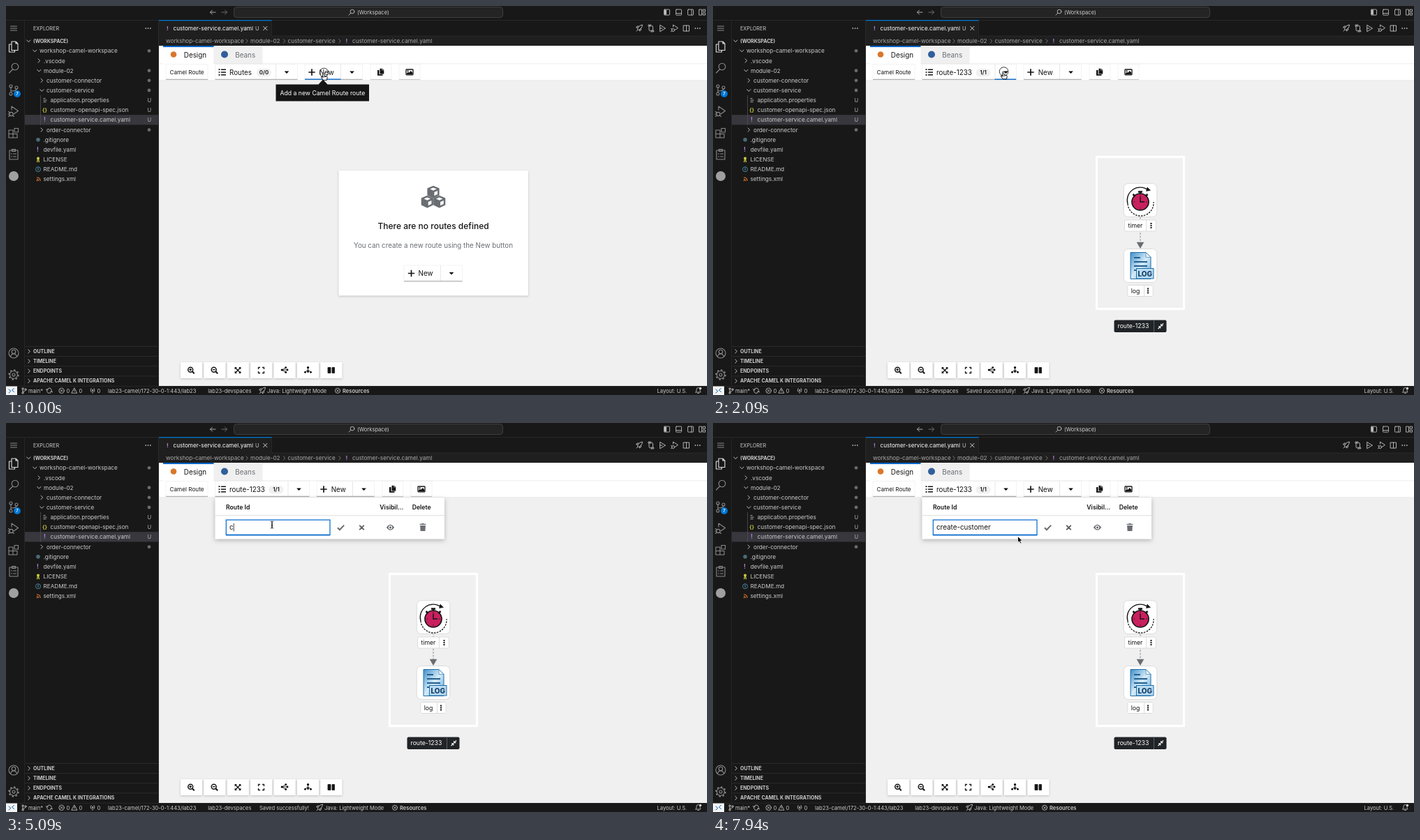
An HTML page that plays this animation: 1004 px wide and 558 px high, repeating every 8000 ms.

```html
<!DOCTYPE html>
<html lang="en">
<head>
<meta charset="utf-8">
<title>Route editor</title>
<style>
html, body { margin: 0; width: 100%; height: 100%; overflow: hidden; background: #181818; }
svg { display: block; width: 1004px; height: 558px; font-family: Inter, "Open Sans", sans-serif; }
text { white-space: pre; }
.tree { font-size: 8.2px; fill: #ccc; }
.head { font-size: 7px; font-weight: 700; fill: #ccc; }
.bar { font-size: 7.55px; fill: #ccc; }
.big { font-size: 9.85px; fill: #151515; }
.mid { font-size: 8.7px; fill: #151515; }
.th { font-size: 8.7px; font-weight: 600; fill: #151515; }
.line { fill: none; stroke: currentColor; stroke-linecap: round; stroke-linejoin: round; }
.btn { fill: #fff; stroke: #ececec; stroke-width: .6; }
.edge { stroke: #8a8d90; stroke-width: .8; }
.hot { stroke: #06c; stroke-width: 1.3; }
.node { fill: #fff; stroke: #d2d2d2; stroke-width: .7; }
.soft { filter: drop-shadow(0 1px 1.5px rgba(0,0,0,.2)); }
</style>
</head>
<body>
<svg id="stage" viewBox="0 0 1004 558">
<defs>
  <path id="down" class="line" d="M-2.6-1.3L0 1.4 2.6-1.3"/>
  <path id="right" class="line" d="M-1.3-2.6L1.4 0-1.3 2.6"/>
  <path id="caret" d="M-3.3-1.5h6.6L0 2z"/>
  <path id="plus" d="M-4.7 0h9.4M0-4.7v9.4" stroke="#151515" stroke-width="1.7"/>
  <g id="lens" class="line"><circle cx="1" cy="-1" r="2.9"/><path d="M-1.2 1.2L-4 4"/></g>
  <g id="zoom"><circle cx="-.8" cy="-.8" r="3.5" fill="none" stroke="#151515" stroke-width="1.5"/><path d="M2 2l2.7 2.7" stroke="#151515" stroke-width="2"/></g>
  <path id="ellipsis" d="M-4-.7h1.5v1.4h-1.5zM-.75-.7h1.5v1.4h-1.5zM2.5-.7h1.5v1.4h-1.5z" fill="currentColor"/>
  <path id="kebab" d="M-1-4h2v2h-2zM-1-1h2v2h-2zM-1 2h2v2h-2z" fill="#151515"/>
  <path id="cross" class="line" d="M-2.7-2.7l5.4 5.4M2.7-2.7l-5.4 5.4"/>
  <path id="check" d="M-4.6.2l3 3L4.7-3.4" fill="none" stroke="currentColor" stroke-width="2"/>
  <g id="eye"><path d="M-5.6 0Q0-8 5.6 0 0 8-5.6 0z" fill="#6a6e73"/><circle r="2.7" fill="#fff"/><circle r="1.6" fill="#6a6e73"/></g>
  <path id="trash" d="M-4.5-5h2.5l.7-.8h2.6l.7.8h2.5v1.3h-9zM-3.9-2.9h7.8L3.4 5.3h-6.8z" fill="#6a6e73"/>
  <g id="cube"><path d="M0-8.3L7.8-5v9L0 7.8-7.8 4v-9z" fill="#6a6e73" stroke="#6a6e73" stroke-width="1.6" stroke-linejoin="round"/><path d="M0-6.5l4.8 2L0-2.3l-4.8-2.2zM1.4 0l4.7-2.1v5L1.4 5.3z" fill="#fff"/></g>
  <g id="panelBox" class="line"><rect x="-4" y="-4" width="8" height="8" rx=".8"/></g>
  <linearGradient id="sheet" x2="1" y2="1"><stop offset="0" stop-color="#3f8fc9"/><stop offset=".5" stop-color="#d5ebf8"/><stop offset="1" stop-color="#5da6d8"/></linearGradient>
</defs>

<!-- window frame -->
<rect width="1004" height="558" fill="#181818"/>
<path d="M0 20.5h1004M26.5 20v525M0 545.3h1004" stroke="#2b2b2b" stroke-width=".8"/>
<rect x="326.5" y="1.5" width="385" height="15" rx="4" fill="#242424" stroke="#474747" stroke-width=".8"/>
<g color="#bbb" stroke-width=".9">
  <path class="line" d="M300 9h-7.5M295.5 6l-3 3 3 3"/>
  <path class="line" d="M309 9h7.5M313.500 6l3 3-3 3" color="#777"/>
  <use href="#lens" x="495" y="9"/>
  <use href="#panelBox" x="946.500" y="9"/><path d="M943 5.500h3v7h-3z" fill="#bbb"/>
  <use href="#panelBox" x="963.500" y="9"/><path class="line" d="M960 10.500h7"/>
  <use href="#panelBox" x="980.500" y="9"/><path class="line" d="M982 5v8"/>
  <path class="line" d="M993 5h3.500v8H993zM998.500 5h3v3h-3zM998.500 10h3v3h-3z"/>
</g>
<text class="bar" x="503" y="11.800">(Workspace)</text>

<!-- activity bar -->
<g color="#8a8a8a" stroke-width="1.100">
  <path class="line" d="M6.500 29h9M6.500 32h9M6.500 35h9"/>
  <path class="line" color="#e0e0e0" d="M8 55H4.500v11h8v-2.500M8 51h6l3 3v9.500H8zM14 51v3h3"/>
  <g class="line"><circle cx="13" cy="87" r="4.800"/><path d="M9.500 91L4.500 96"/></g>
  <g class="line"><circle cx="7" cy="115" r="2"/><circle cx="7" cy="126" r="2"/><circle cx="15" cy="117" r="2"/><path d="M7 117v7M15 119q0 3-8 3"/></g>
  <circle cx="16" cy="126" r="5" fill="#0078d4"/><text x="16" y="128.200" font-size="6" font-weight="600" fill="#fff" text-anchor="middle">7</text>
  <g class="line"><path d="M8 149v-5l9.500 6.500-6.500 4.500"/><circle cx="7.500" cy="155" r="2.600"/><path d="M3.500 151.500l2 1.500M3 155h2M3.500 158.500l2-1.500M11.500 158.500l-2-1.500"/></g>
  <path class="line" d="M4 178h6v11H4zM4 183.500h12v5.500H4zM12 175.500h5.500v5.500H12z"/>
  <path class="line" d="M5 207h12v13H5zM8.500 205.500h5v3h-5zM7.500 212h1M10.500 212h4M7.500 216h1M10.500 216h4"/>
  <circle cx="11" cy="244" r="7" fill="#a0a0a0"/>
  <g class="line"><circle cx="11" cy="498" r="7"/><circle cx="11" cy="496" r="2.700"/><path d="M6.500 503q1-4 4.500-4t4.500 4"/></g>
  <g class="line"><circle cx="11" cy="529" r="5.500"/><circle cx="11" cy="529" r="2"/><circle cx="11" cy="529" r="6.800" stroke-dasharray="2.400 2.940" stroke-width="1.700" stroke-linecap="butt"/></g>
</g>

<!-- explorer -->
<text x="39" y="34.700" font-size="7.250" fill="#ccc">EXPLORER</text>
<use href="#ellipsis" x="203.500" y="32" color="#ccc"/>
<g id="tree"></g>
<path d="M49.500 128v43" stroke="#585858" stroke-width=".7"/>
<path d="M218.500 20v525" stroke="#2b2b2b"/>

<!-- editor tabs and breadcrumbs -->
<rect x="219" y="20" width="161.500" height="23" fill="#1f1f1f"/>
<rect x="219" y="43" width="785" height="14" fill="#1f1f1f"/>
<path d="M380.500 20v23M380 43h624" stroke="#2b2b2b" stroke-width=".8"/>
<path d="M219 20.600h161.500" stroke="#0078d4" stroke-width="1.200"/>
<g class="tree">
  <text x="230" y="35.200" fill="#b180d7" font-weight="700">!</text>
  <text x="239.500" y="35" fill="#fff">customer-service.camel.yaml</text>
  <text x="357" y="34.800" font-size="7.300">U</text>
  <g fill="#a9a9a9">
    <text x="229" y="53.200">workshop-camel-workspace</text><text x="350" y="53.200">module-02</text>
    <text x="403.500" y="53.200">customer-service</text><text x="496" y="53.200">customer-service.camel.yaml</text>
  </g>
  <text x="486.500" y="53.200" fill="#b180d7" font-weight="700">!</text>
</g>
<g color="#8a8a8a" stroke-width=".8"><use href="#right" x="345" y="50.300"/><use href="#right" x="398.500" y="50.300"/><use href="#right" x="478" y="50.300"/></g>
<use id="close" href="#cross" x="371.300" y="32" color="#ddd" stroke-width=".9"/>
<circle id="dirty" cx="371.300" cy="32" r="2.900" fill="#fff"/>
<g color="#c5c5c5" stroke-width=".9" class="line">
  <path id="rocket" d="M904.500 33q1-5 7-6-.5 6-6 7.500zM904.500 31h-2l1.500-2h2M907.500 34v2l2-1.500v-2M903 36l1.500-1.500"/>
  <path d="M921 29v5q0 2 2.500 2h1M926.500 35v-5q0-2-2.500-2h-1M923.500 26.500l-1.500 1.500 1.500 1.500M924 34.500l1.500 1.500-1.500 1.500"/><circle cx="921" cy="28" r="1.200"/><circle cx="926.500" cy="36" r="1.200"/>
  <path d="M937 27.500l7.500 4.500-7.500 4.500zM937 32h3"/>
  <path d="M955.500 30v-3l7 4.500-4.500 3"/><circle cx="955.500" cy="34.500" r="2"/><path d="M952.500 32.500l1.500 1M952.500 36.500l1.500-1"/>
  <path d="M970.500 28h8v8h-8zM974.500 28v8"/>
</g>
<use href="#ellipsis" x="990.500" y="32" color="#ccc"/>

<!-- designer -->
<rect x="219" y="57" width="785" height="488" fill="#f0f0f0"/>
<rect x="219" y="57" width="785" height="50" fill="#fff"/>
<rect x="297.500" y="57.500" width="70" height="25.500" fill="#f0f0f0"/>
<path d="M219 82.800h6M297.500 82.800H1004M219 106.600h785" stroke="#e0e0e0" stroke-width=".6"/>
<path d="M225 58h72.500" stroke="#06c" stroke-width="1.800"/>
<circle cx="240" cy="69.500" r="4.300" fill="#d9772b"/><circle cx="313" cy="69.500" r="5" fill="#315f9b"/>
<text class="big" x="254.800" y="73.700">Design</text><text class="big" x="328.300" y="73.700" style="fill:#6a6e73">Beans</text>
<rect class="btn" x="229" y="83.500" width="60" height="22"/><path class="edge" d="M229 105.300h60"/>
<text x="234.500" y="97.700" font-size="8.200" fill="#151515">Camel Route</text>
<rect id="pick" class="btn" x="299.500" y="83.500" height="22"/><path id="pickEdge" class="edge"/>
<path d="M304.500 91.200h2M304.500 95h2M304.500 98.800h2" stroke="#151515" stroke-width="1.700"/><path d="M308 91.200h7M308 95h7M308 98.800h7" stroke="#151515" stroke-width="1.400"/>
<text id="pickText" class="big" x="320" y="98.500"></text>
<g id="pickEnd">
  <rect x="359" y="89.800" width="21" height="11.500" rx="5.700" fill="#f0f0f0"/>
  <text id="count" x="369.500" y="98.300" font-size="7.900" font-weight="600" fill="#151515" text-anchor="middle"></text>
  <path d="M386.500 84v21" stroke="#ddd" stroke-width=".7"/><use href="#caret" x="402" y="95"/>
</g>
<path id="pickHot" class="hot" d="M403.500 105.200h30.500"/>
<g id="tools">
  <rect class="btn" x="428" y="83.500" width="82.500" height="22"/><path d="M479.500 84v21" stroke="#ddd" stroke-width=".7"/>
  <path class="edge" d="M428 105.300h82.500M522 105.300h30M563 105.300h30"/>
  <path id="newHot" class="hot" d="M428 105.200h51.500"/>
  <use href="#plus" x="438" y="95"/><text class="big" x="448.700" y="98.500">New</text><use href="#caret" x="495.500" y="95"/>
  <rect class="btn" x="522" y="83.500" width="30" height="21.500"/><rect class="btn" x="563" y="83.500" width="30" height="21.500"/>
  <path d="M532 92h2.500v6h5v1.800H532zM535.500 89.700h3v2.500h2.800v5.200h-5.800zM539.200 89.700l2.100 2h-2.100z" fill="#151515"/>
  <rect x="573" y="91" width="10" height="7.800" rx=".8" fill="none" stroke="#151515" stroke-width="1.300"/><path d="M574 98v-1.500l2-2 1.200 1.200 2.600-2.800 2.400 2.500V98z" fill="#151515"/><circle cx="575.600" cy="93.300" r="1"/>
</g>

<g id="empty">
  <rect x="476.500" y="236" width="271.500" height="179.500" fill="#fff" class="soft"/>
  <use href="#cube" x="612" y="267"/><use href="#cube" x="603.300" y="281"/><use href="#cube" x="620.700" y="281"/>
  <text x="612" y="320.300" font-size="12" font-weight="500" fill="#151515" text-anchor="middle">There are no routes defined</text>
  <text x="612" y="347.200" font-size="9.800" fill="#6a6e73" text-anchor="middle">You can create a new route using the New button</text>
  <rect class="btn" x="570" y="372" width="83.500" height="23"/><path d="M622.500 372v23" stroke="#ddd" stroke-width=".7"/><path class="edge" d="M570 394.800h83.500"/>
  <use href="#plus" x="580.500" y="383.500"/><text class="big" x="590.500" y="387.200">New</text><use href="#caret" x="638" y="383.500"/>
  <g id="tip"><path d="M386.500 112.500h61l6.500-7 6.500 7h59.500v24H386.500z" fill="#151515"/><text x="453.300" y="127.900" font-size="8.700" fill="#fff" text-anchor="middle">Add a new Camel Route route</text></g>
</g>

<g id="route">
  <rect x="549.500" y="216.500" width="125" height="218" fill="#f0f0f0" stroke="#fff" stroke-width="3.200"/>
  <path id="dash" d="M612 303v37" stroke="#777" stroke-width=".9" stroke-dasharray="2.500 2"/>
  <path d="M606.700 338.800h10.600L612 348z" fill="#6a6e73"/>
  <rect class="node" x="588.300" y="254.500" width="47.500" height="48" rx="6.500"/>
  <rect class="node" x="588.300" y="348.500" width="47.500" height="48" rx="6.500"/>
  <g fill="none" stroke="#151515">
    <path d="M594 284a18.500 18.500 0 0 1 29-20" stroke-width="1.300"/>
    <path d="M594 284a18.500 18.500 0 0 0 37-3" stroke-width="1.300" stroke-dasharray="2.500 1.500"/>
    <path d="M622 260l4.500 4.500-6 1z" fill="#151515" stroke-width=".6"/>
    <circle cx="612" cy="281" r="12" fill="#c9205f" stroke-width="1.700"/>
    <path d="M609 266.500h6M612 266.500v3M601.500 270l3 3M622.500 270l-3 3" stroke-width="2.500"/>
    <path d="M612 273.500v7.500h6" stroke-width="1.500"/><path d="M612 271v1.500M612 289.500v1.500M602.500 281h1.500M620 281h1.500"/>
  </g>
  <path d="M598 353.500h22l7 7v31h-29z" fill="url(#sheet)" stroke="#236fa8" stroke-width="1"/><path d="M620 353.500v7h7z" fill="#eaf6fd" stroke="#236fa8" stroke-width=".6"/>
  <path d="M603 361h9M603 367h19M603 373h19M603 379h4" stroke="#245f91" stroke-width="2"/>
  <rect x="606.500" y="376.500" width="24.500" height="14.500" fill="#b9dcf2" stroke="#236fa8"/><text x="618.800" y="387.600" font-size="10" font-weight="800" fill="#143f69" text-anchor="middle">LOG</text>
  <rect class="node" x="589.500" y="307" width="45" height="16" rx="2"/><path d="M620.500 307v16M617.500 400.500v16" stroke="#d2d2d2" stroke-width=".7"/>
  <rect class="node" x="594" y="400.500" width="36" height="16" rx="2" fill-opacity="0"/>
  <path d="M594.500 401h22.500v15h-22.500zM618 401h11.500v15H618z" fill="#fff"/>
  <text class="mid" x="594.500" y="318.200">timer</text><text class="mid" x="598.700" y="411.600">log</text>
  <use href="#kebab" x="627.500" y="315"/><use href="#kebab" x="623" y="408.500"/>
  <rect x="574.500" y="450.500" width="75" height="17.500" rx="2" fill="#212427"/><path d="M631.500 450.500v17.500" stroke="#6a6e73" stroke-width=".8"/>
  <text class="mid" x="579.500" y="462.400" style="fill:#fff">route-1233</text>
  <path d="M645 455.500l-3.300 3.300M641.700 456v2.800h2.800M637.500 463l3.300-3.300M640.800 462.500v-2.800H638" fill="none" stroke="#fff" stroke-width="1.100"/>
</g>

<!-- canvas controls -->
<g id="controls"></g>
<g fill="none" stroke="#151515" stroke-width="1.300">
  <use href="#zoom" x="265" y="522.500"/><path d="M262.300 521.700h3.800M264.200 519.800v3.800"/>
  <use href="#zoom" x="298.500" y="522.500"/><path d="M295.800 521.700h3.800"/>
  <path d="M328.500 519l7 7M335.500 519l-7 7"/><path d="M327.600 518.100h3.300l-3.300 3.300zM336.400 518.100v3.300l-3.300-3.300zM327.600 526.900v-3.300l3.300 3.300zM336.400 526.900h-3.300l3.300-3.300z" fill="#151515" stroke="none"/>
  <path d="M361.500 521v-2.500h2.500M367 518.500h2.500v2.500M369.500 524v2.500H367M364 526.500h-2.500V524"/>
  <path d="M395.500 522l5-3M395.500 522h7M395.500 522l5 3.500" stroke-width=".9"/><path d="M432.500 519v4M432.500 522l-4 3M432.500 522l4 3" stroke-width=".9"/>
  <path d="M461 518.500h4v8h-4zM467 518.500h3.500v8H467z" fill="#151515" stroke-width=".8"/>
</g>
<g><circle cx="395.300" cy="522" r="1.600"/><circle cx="400.700" cy="518.700" r="1.400"/><circle cx="403" cy="522" r="1.400"/><circle cx="400.700" cy="525.500" r="1.400"/><circle cx="432.500" cy="518.500" r="1.600"/><circle cx="428.500" cy="525.300" r="1.400"/><circle cx="432.500" cy="524.500" r="1.400"/><circle cx="436.500" cy="525.300" r="1.400"/></g>

<!-- route list -->
<g id="panel">
  <rect id="sheetBox" x="299.500" y="107" fill="#fff" style="filter:drop-shadow(0 2px 3px rgba(0,0,0,.25))"/>
  <path id="rule" stroke="#d2d2d2" stroke-width=".7"/>
  <text class="th" x="315" y="124.200">Route Id</text>
  <g id="cols"><text class="th" x="535.300" y="124.200">Visibil...</text><text class="th" x="581.700" y="124.200">Delete</text><use href="#eye" x="550.500" y="149.800"/><use href="#trash" x="597" y="149.800"/></g>
  <g id="view"><text class="big" x="315" y="153.300">route-1233</text><path d="M377 153.500l.6-2.700 5.200-5.200 2.100 2.100-5.200 5.200z" fill="#6a6e73"/></g>
  <g id="edit">
    <rect id="field" x="315.300" y="139" height="21.700" fill="#fff" stroke="#06c" stroke-width="1.200"/><path id="under" stroke="#06c" stroke-width="1.600"/>
    <text id="typed" class="big" x="320" y="153.400"></text><path id="bar" stroke="#151515" stroke-width=".8"/>
    <use id="ok" href="#check"/><use id="no" href="#cross" stroke-width="1.900"/>
  </g>
  <g id="error">
    <circle cx="583" cy="148" r="4.200" fill="#c9190b"/><path d="M583 145.500v3M583 149.500v1.200" stroke="#fff" stroke-width="1.200"/>
    <text class="mid" x="589.700" y="151" style="fill:#a30000">Name should only contain lowercase</text><text class="mid" x="589.700" y="164.300" style="fill:#a30000">letters, numbers, and dashes</text>
  </g>
</g>

<!-- status bar -->
<rect y="545.500" width="16" height="12.500" fill="#f4f4f4"/>
<path d="M4 550l3 2.500-3 2.500M11.500 548.500l-3 2.500 3 2.500" class="line" color="#0b65b5" stroke-width="1"/>
<g class="line" color="#ccc" stroke-width=".8">
  <circle cx="24" cy="549" r="1.200"/><circle cx="24" cy="555" r="1.200"/><circle cx="28" cy="550" r="1.200"/><path d="M24 550.200v3.600M28 551.200q0 1.800-4 1.800"/>
  <path d="M58.500 551q1-3 3.500-3t3.500 3M65.500 552.500q-1 3-3.500 3t-3.500-3M57.500 549.500l1 1.800 1.800-.8M66.500 554l-1-1.800-1.800.8"/>
  <circle cx="79.500" cy="551.800" r="3.700"/><path d="M78 550.300l3 3M81 550.300l-3 3"/><path d="M98 548.200l3.800 7h-7.600zM98 550.500v2.200"/>
  <path d="M122 548.500q-2 2.500 0 5M126 548.500q2 2.500 0 5M124 551.500v4"/><circle cx="124" cy="551" r=".7"/>
  <path d="M988 554h7q-1-1-1-4a2.500 2.500 0 0 0-5 0q0 3-1 4zM990.500 555.500h2"/>
</g>
<circle cx="994.500" cy="548.500" r="1.700" fill="#ccc"/>
<g class="bar">
  <text x="32" y="554.500">main*</text><text x="86.500" y="554.500">0</text><text x="104.500" y="554.500">0</text><text x="130.500" y="554.500">0</text>
  <text x="146" y="554.500">lab23-camel/172-30-0-1:443/lab23</text><text x="289.300" y="554.500">lab23-devspaces</text>
  <text id="saved" x="363" y="554.500">Saved successfully!</text>
  <g id="tail"><text x="374" y="554.500">Java: Lightweight Mode</text><text x="482" y="554.500" font-weight="600">Resources</text>
    <use href="#rocket" x="-540" y="520" class="line" color="#ccc" stroke-width=".8"/>
    <g class="line" color="#ccc" stroke-width=".8"><circle cx="475" cy="551.800" r="3.600"/><path d="M473.600 550.400l2.800 2.800M476.400 550.400l-2.800 2.800"/></g></g>
  <text x="932.500" y="554.500">Layout: U.S.</text>
</g>

<!-- pointer -->
<g id="pointer">
  <path id="arrow" d="M0 0v9.200l2.100-2 1.400 3.200 1.700-.7-1.400-3.200h2.900z" fill="#000" stroke="#fff" stroke-width=".8"/>
  <path id="hand" d="M-1 1q0-1.300 1-1.300t1 1.300v3l3.700.8q1.100.3 1 1.500l-.7 4H-.2L-3 6.500q-.5-1.200.5-1.300l1.500 1.300z" fill="#fff" stroke="#000" stroke-width=".9"/>
  <path id="beam" d="M-2-5q2 0 2 1.200v7.600q0 1.200-2 1.200M2-5q-2 0-2 1.200v7.600q0 1.200 2 1.200M-1 1h2" fill="none" stroke="#111" stroke-width=".9"/>
  <circle id="ring" cx="1" cy="-.5" r="6.300" fill="none" stroke="#222" stroke-width=".9"/>
</g>
</svg>
<script>
const $ = id => document.getElementById(id);
const set = (id, attrs) => { for (const k in attrs) $(id).setAttribute(k, attrs[k]); };
const show = (id, on) => { $(id).style.display = on ? '' : 'none'; };
const use = (id, x, y, color = '#ccc') => `<use href="#${id}" x="${x}" y="${y}" color="${color}" stroke-width=".9"/>`;
const glyph = (s, x, y, color, size = 8) => `<text x="${x}" y="${y + 3}" font-size="${size}" font-weight="700" fill="${color}" text-anchor="middle">${s}</text>`;

// name, text x, icon, trailing mark
const rows = [
  ['(WORKSPACE)', 39, 'down'], ['workshop-camel-workspace', 48, 'down', '•'], ['.vscode', 54, 'right'],
  ['module-02', 54, 'down', '•'], ['customer-connector', 58, 'right', '•'], ['customer-service', 58, 'down', '•'],
  ['application.properties', 63.5, 'lines', 'U'], ['customer-openapi-spec.json', 63.5, '{}', 'U'],
  ['customer-service.camel.yaml', 63.5, '!', 'U'], ['order-connector', 58, 'right', '•'],
  ['.gitignore', 53.5, 'dot'], ['devfile.yaml', 53.5, '!'], ['LICENSE', 53.5, 'key'],
  ['README.md', 53.5, 'info'], ['settings.xml', 53.5, 'feed']
];
const icons = {
  lines: (x, y) => `<path d="M${x - 2.5} ${y - 2.5}h3m-3 2.500h5m-5 2.500h4" stroke="#aaa" stroke-width="1"/>`,
  '{}': (x, y) => glyph('{}', x - .5, y - .3, '#cbcb41', 7.5),
  '!': (x, y) => glyph('!', x - .5, y, '#b180d7', 8.5),
  dot: (x, y) => `<circle cx="${x}" cy="${y}" r="2.800" fill="#4d6a78"/>`,
  key: (x, y) => `<circle cx="${x}" cy="${y - 1.7}" r="2" fill="#cbcb41"/><path d="M${x - .5} ${y}l-1 4m2-4l1 4" stroke="#cbcb41" stroke-width="1.300"/>`,
  info: (x, y) => `<circle cx="${x}" cy="${y}" r="3.500" fill="none" stroke="#519aba" stroke-width=".8"/>` + glyph('i', x, y - .8, '#519aba', 6),
  feed: (x, y) => `<g fill="none" stroke="#e37933" stroke-width="1.100"><path d="M${x - 2} ${y - 2.5}q5 0 5 5M${x - 2} ${y}q2.500 0 2.500 2.500"/></g><circle cx="${x - 1.6}" cy="${y + 2}" r=".8" fill="#e37933"/>`
};
let tree = '<rect x="27" y="156.200" width="191.500" height="14.200" fill="#37373d"/>';
rows.forEach(([name, x, icon, mark], i) => {
  const y = 50.2 + 14.16 * i;
  tree += icons[icon] ? icons[icon](x - 7.5, y) : use(icon, x - 6.7, y);
  tree += `<text class="${i ? 'tree' : 'head'}" x="${x}" y="${y + (i ? 3 : 2.6)}">${name}</text>`;
  if (mark === 'U') tree += `<text x="202.500" y="${y + 2.7}" font-size="7.500" fill="#b5b5b5">U</text>`;
  if (mark === '•') tree += `<circle cx="205" cy="${y}" r="2.400" fill="#6b6b6b"/>`;
});
['OUTLINE', 'TIMELINE', 'ENDPOINTS', 'APACHE CAMEL K INTEGRATIONS'].forEach((name, i) => {
  const y = 495.4 + 14.16 * i;
  tree += `<path d="M27 ${y - 7}h191.500" stroke="#303030" stroke-width=".8"/>` + use('right', 33, y) + `<text class="head" x="39" y="${y + 2.6}">${name}</text>`;
});
$('tree').innerHTML = tree;
$('controls').innerHTML = [0, 1, 2, 3, 4, 5, 6].map(i =>
  `<rect class="soft" x="${250 + i * 33.4}" y="511" width="31" height="23" fill="#fff"/>`).join('');

const LOOP = 8000, STEP = 150;
const edits = [
  [3440, 'route-1233'], [4190, 'route-12'], [4340, 'route'], [4490, 'ro'], [4640, ''],
  [4940, 'c'], [5240, 'cr'], [5390, 'cre'], [5540, 'crea'], [5690, 'creat'], [5840, 'create'], [6140, 'create-'],
  [6740, 'create-c'], [6890, 'create-cu'], [7040, 'create-cust'], [7190, 'create-custom'], [7340, 'create-customer']
];
// time, x, y, shape from that time on
const path = [
  [0, 454.5, 96, 'hand'], [450, 454, 95, 'arrow'], [1640, 454, 95, 'arrow'], [1940, 415.5, 94.5, 'hand'],
  [2540, 415.5, 94.5, 'arrow'], [3140, 381, 147, 'hand'], [3440, 381, 146, 'beam'], [7490, 381, 146, 'beam'],
  [7640, 388, 148, 'beam'], [7940, 436.500, 162.5, 'arrow'], [LOOP, 436.500, 162.5, 'arrow']
];
const rings = [0, 2090, 3290];

// The screen refreshes every 150 ms, with one short tick before 890.
const tick = t => t < 890 ? Math.floor(t / STEP) * STEP : 890 + Math.floor((t - 890) / STEP) * STEP;

function drawPointer(t) {
  const i = path.findIndex((p, n) => n + 1 === path.length - 1 || t < path[n + 1][0]);
  const [t0, x0, y0, shape] = path[i], [t1, x1, y1] = path[i + 1];
  const k = Math.min(1, Math.max(0, (t - t0) / (t1 - t0)));
  const e = k * k * (3 - 2 * k);
  set('pointer', { transform: `translate(${x0 + (x1 - x0) * e} ${y0 + (y1 - y0) * e})` });
  const kind = t >= 7790 ? 'arrow' : shape;
  for (const s of ['arrow', 'hand', 'beam']) show(s, s === kind);
  show('ring', rings.includes(t));
}

function drawPanel(t) {
  show('panel', t >= 2240);
  if (t < 2240) return;
  const editing = t >= 3440, wrong = t >= 6140 && t < 6740;
  const shift = wrong ? 286.5 : editing ? 0 : -130;
  const width = 328.5 + shift, fieldEnd = wrong ? 578 : 464;
  set('sheetBox', { width, height: wrong ? 66 : 59.5 });
  set('rule', { d: `M299.500 132.700h${width}` });
  set('cols', { transform: `translate(${shift})` });
  show('view', !editing);
  show('edit', editing);
  show('error', wrong);
  if (!editing) return;
  const [since, text] = edits.filter(e => e[0] <= t).pop();
  set('field', { width: fieldEnd - 315.3 });
  set('under', { d: `M315 ${wrong ? 166.5 : 160.5}H${fieldEnd}` });
  $('typed').textContent = text;
  const x = 320.6 + (text ? $('typed').getComputedTextLength() : 0);
  set('bar', { d: `M${x} 144v11.500` });
  show('bar', t > 4000 && t - since < 450);
  set('ok', { x: wrong ? 766 : 479.5, y: wrong ? 153 : 150, color: wrong ? '#d2d2d2' : '#6a6e73' });
  set('no', { x: wrong ? 796 : 509.5, y: wrong ? 153 : 150, color: '#5a5e63' });
}

function draw(t) {
  const made = t >= 450, dirty = made && t < 1790, saved = t >= 1790 && t < 5540;
  const grow = made ? 17 : 0;
  show('empty', !made);
  show('route', made);
  show('dirty', dirty);
  show('close', !dirty);
  show('saved', saved);
  set('tail', { transform: `translate(${saved ? 82 : 0})` });
  set('pick', { width: 118 + grow });
  set('pickEdge', { d: `M299.500 105.300h${118 + grow}` });
  $('pickText').textContent = made ? 'route-1233' : 'Routes';
  $('count').textContent = made ? '1/1' : '0/0';
  set('pickEnd', { transform: `translate(${made ? 17.5 : 0})` });
  set('tools', { transform: `translate(${grow})` });
  show('newHot', t < 1790);
  show('pickHot', t >= 1940 && t < 2690);
  set('dash', { 'stroke-dashoffset': -t * .0085 });
  drawPanel(t);
  drawPointer(t);
}

const start = performance.now();
function loop() {
  draw(tick((performance.now() - start) % LOOP));
  requestAnimationFrame(loop);
}
loop();
</script>
</body>
</html>
```
